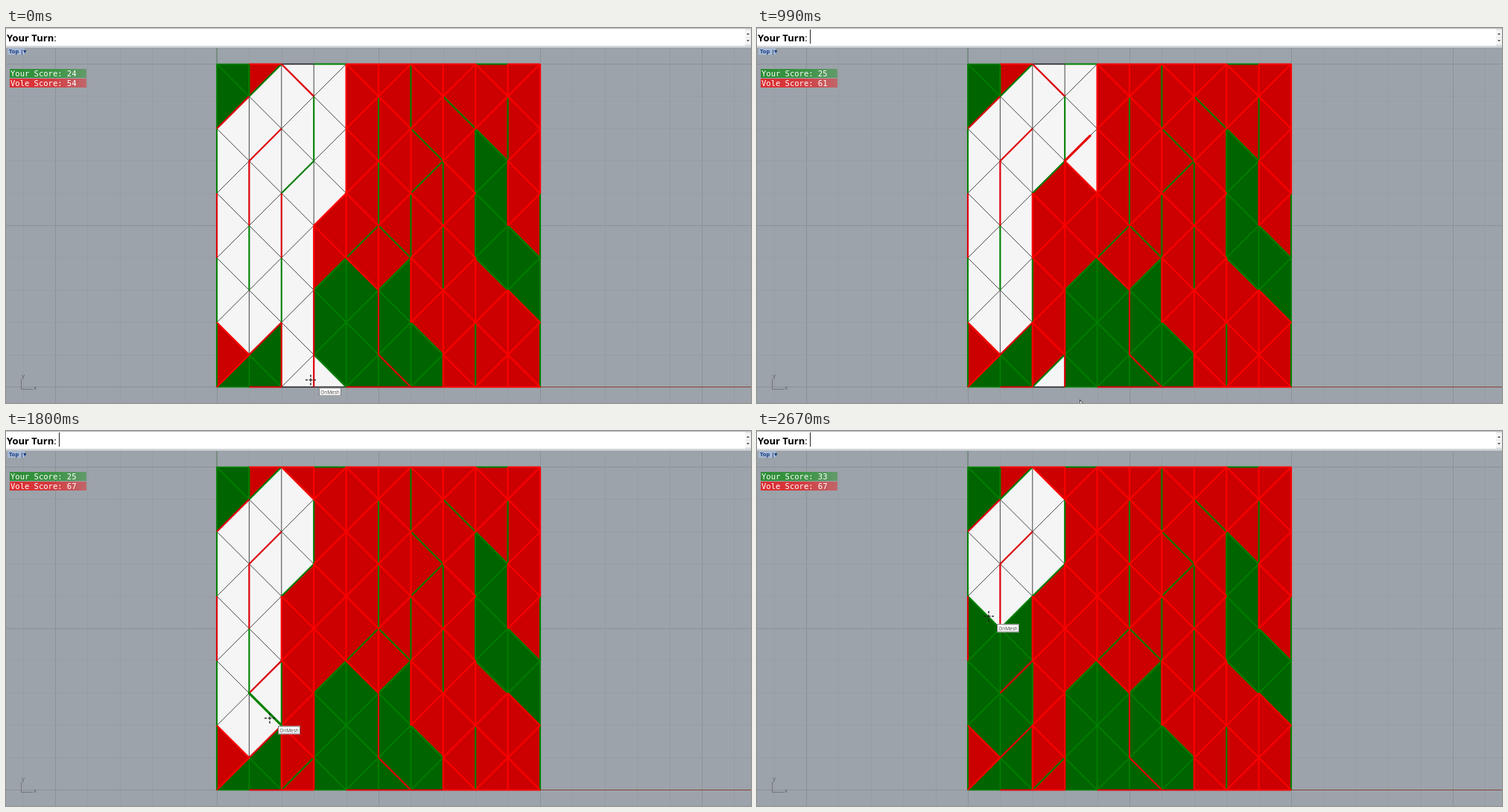
An HTML page with a canvas for the animation above (2.7 s loop, 1000 px wide and 504 px high).

```html
<!DOCTYPE html>
<html lang="en">
<head>
<meta charset="utf-8">
<title>Triangle game</title>
<style>
  html, body { margin: 0; width: 100%; height: 100%; overflow: hidden; background: #9ca3aa; }
  #stage { position: relative; width: 1000px; height: 504px; overflow: hidden; }
  canvas, .label { position: absolute; left: 0; top: 0; }
  .label { white-space: pre; line-height: 1; }
  #prompt { left: 1px; top: 6px; font: bold 13px/14px "Open Sans", "Noto Sans", sans-serif; color: #000; }
  #prompt span { font-weight: normal; }
  #view { left: 2px; top: 27px; width: 23px; height: 9px; background: #a9b9d2;
    font: bold 7.5px/9px "Open Sans", sans-serif; color: #123a80; text-indent: 2px; }
  .score { left: 5px; width: 103px; height: 12px; text-indent: 1px; color: #fff;
    font: 10.5px/12px "DejaVu Sans Mono", monospace; }
  #yours { top: 55px; background: linear-gradient(90deg, #2b8c34, #3d9546 60%, #639a6b); }
  #theirs { top: 68px; background: linear-gradient(90deg, #dc2c30, #d5393d 50%, #c0666a); }
  .axis { font: 8px/8px "Open Sans", sans-serif; color: #5c6166; }
  #tip { width: 28px; height: 9px; border: 1px solid #777; background: #fff; text-align: center;
    font: 6.5px/9px "Open Sans", sans-serif; color: #444; }
</style>
</head>
<body>
<div id="stage">
  <canvas id="board" width="1000" height="504"></canvas>
  <div id="prompt" class="label">Your Turn<span>:</span></div>
  <div id="view" class="label">Top |▾</div>
  <div id="yours" class="label score"></div>
  <div id="theirs" class="label score"></div>
  <div class="label axis" style="left:21px;top:463px">y</div>
  <div class="label axis" style="left:37px;top:479px">x</div>
  <div id="tip" class="label">OnMesh</div>
</div>
<script>
const LOOP = 2700, STEP = 30, N = 10, CELL = 43.4, LEFT = 283, TOP = 48.5;
const FILL = { R: '#cc0000', G: '#006400', W: '#f5f5f5' };
const byId = id => document.getElementById(id);
const ctx = byId('board').getContext('2d');

// One string per column, top to bottom: R and G are owned, W is free.
const columns = ['GGWWWWWWWRG', 'RWWWWWWWWGG', 'WWWWWWWWWWW', 'WWWWWRRGGGW', 'RRRRRRRGGGG',
  'RRRRRRRGGGG', 'RRRRRRRRRGG', 'RRRRRRRRRRR', 'RRRGGGGRRRR', 'RRRRRRGGRRR'];

// An edge is two vertices, each a column and a row digit in base 11.
const drawn = {
  R: '0406 1315 2426 282a 3537 3739 393a 4042 4244 5759 6668 797a 9395 0211 2031 1322 3544 ' +
     '0819 1928 0a19 596a 1a2a 4657 97a8 4a5a 5a6a 6a7a',
  G: '0204 0608 080a 1011 1517 2628 3133 5153 5355 6062 6466 7375 7577 888a 9193 a4a6 a8aa ' +
     '3040 8090 1120 2433 394a 4655 5566 6473 6273 7182'
};
const rivalMoves = '2839 2837 3726 2635 3524 3533 3344 3342 4231 3140 3031 2a3a 2030 1726';
const playerMoves = '3a4a 2a39 1728 1719 0817 0617 0615 1526 1524 0415';
const playerEnds = [120, 205, 1830, 1940, 2050, 2160, 2270, 2380, 2490, 2610];

const cursorPath = [
  [0, 409, 473], [90, 430, 476], [150, 397, 459], [205, 397, 462], [240, 433, 499],
  [1630, 433, 499], [1740, 362, 394], [1800, 354, 386], [1910, 331, 394], [2020, 306, 374],
  [2130, 310, 346], [2240, 306, 287], [2350, 348, 288], [2460, 347, 247], [2580, 311, 249], [2700, 311, 249]
];

const name = (i, j) => i.toString(11) + j.toString(11);
const keyOf = (a, b) => a < b ? a + b : b + a;
const normal = e => keyOf(e.slice(0, 2), e.slice(2));
const point = v => [LEFT + CELL * parseInt(v[0], 11), TOP + CELL * parseInt(v[1], 11)];
const ends = e => [point(e.slice(0, 2)), point(e.slice(2))];

const triangles = [], edges = {};
columns.forEach((column, i) => {
  for (let k = 0; k <= N; k++) {
    const apex = (i + k) % 2 ? i + 1 : i, base = 2 * i + 1 - apex;
    const v = [name(apex, k), name(base, Math.max(0, k - 1)), name(base, Math.min(N, k + 1))];
    const keys = [keyOf(v[0], v[1]), keyOf(v[1], v[2]), keyOf(v[2], v[0])];
    keys.forEach(key => (edges[key] = edges[key] || []).push(triangles.length));
    triangles.push({ corners: v.map(point), keys, owner: column[k] });
  }
});

function firstState() {
  const owners = triangles.map(t => t.owner), lines = {};
  for (const key in edges) {
    const sides = edges[key].map(n => owners[n]);
    if (!sides.includes('W')) lines[key] = sides.includes('G') ? 'G' : 'R';
  }
  for (const c in drawn) drawn[c].split(' ').forEach(e => { lines[normal(e)] = c; });
  return { owners, lines };
}

function play(state, move) {
  const key = normal(move.edge);
  const lines = { ...state.lines, [key]: move.color }, owners = state.owners.slice();
  edges[key].forEach(n => {
    if (owners[n] === 'W' && triangles[n].keys.every(k => lines[k])) owners[n] = move.color;
  });
  return { owners, lines };
}

const moves = [
  ...rivalMoves.split(' ').map((edge, n) => ({ edge, color: 'R', start: 212 + 100 * n, end: 312 + 100 * n })),
  ...playerMoves.split(' ').map((edge, n) => ({ edge, color: 'G', start: playerEnds[n] - 60, end: playerEnds[n] }))
].sort((a, b) => a.end - b.end);
const states = [firstState()];
moves.forEach(m => states.push(play(states[states.length - 1], m)));

function line(x1, y1, x2, y2, color, width) {
  ctx.strokeStyle = color;
  ctx.lineWidth = width;
  ctx.beginPath();
  ctx.moveTo(x1, y1);
  ctx.lineTo(x2, y2);
  ctx.stroke();
}

function box(x, y, w, h, color) {
  ctx.fillStyle = color;
  ctx.fillRect(x, y, w, h);
}

function polygon(points, color) {
  ctx.fillStyle = color;
  ctx.beginPath();
  points.forEach(p => ctx.lineTo(...p));
  ctx.fill();
}

function drawBackground() {
  box(0, 0, 1000, 504, '#9ca3aa');
  for (let n = -6; n <= 16; n++) {
    const color = n % 5 ? '#969da3' : '#8a9197';
    const x = Math.round(LEFT + CELL * n) + 0.5, y = Math.round(TOP + CELL * n - 0.5) + 0.5;
    line(x, 27, x, 504, color, 1);
    if (n >= 0 && n <= N) line(0, y, 1000, y, color, 1);
  }
  line(283, 27, 283, 48, '#5c7f62', 1);
  line(717, 482.5, 1000, 482.5, '#8a4238', 1);
  line(20.5, 472, 20.5, 486, '#70767b', 1);
  line(20, 485.5, 36, 485.5, '#70767b', 1);
}

function drawBar(t) {
  box(0, 0, 1000, 27, '#e4e6e8');
  box(0, 1, 992, 23, '#fff');
  box(0, 0, 1000, 1, '#b4b8bc');
  box(0, 24, 1000, 1, '#c3c7ca');
  box(0, 26, 1000, 1, '#a9afb5');
  [3, 13].forEach(y => box(992, y, 7, 9, '#f5f5f5'));
  polygon([[994, 9], [998, 9], [996, 6.5]], '#555');
  polygon([[994, 16], [998, 16], [996, 18.5]], '#555');
  if (t >= STEP) box(71, 2, 1, 19, '#222');
}

function drawBoard({ owners, lines }) {
  triangles.forEach((tri, n) => {
    polygon(tri.corners, FILL[owners[n]]);
    ctx.strokeStyle = FILL[owners[n]];
    ctx.lineWidth = 0.6;
    ctx.closePath();
    ctx.stroke();
  });
  const layer = (wanted, paint) => {
    for (const key in edges) {
      if (lines[key] !== wanted) continue;
      const [a, b] = ends(key), sides = edges[key].map(n => owners[n]);
      paint(a, b, sides);
    }
  };
  layer(undefined, (a, b, sides) => line(...a, ...b, '#1c1c1c', sides.length > 1 ? 0.8 : 1.5));
  layer('G', (a, b, sides) =>
    line(...a, ...b, '#008000', sides.every(s => s === 'G') ? 1.7 : 2.1));
  layer('R', (a, b, sides) =>
    line(...a, ...b, sides.includes('R') ? '#fa0000' : '#dc000a', 2.2));
}

function drawMove(move, t) {
  const [a, b] = ends(move.edge);
  const part = move.color === 'R' ? (t - move.start) / (move.end - move.start) : 1;
  const tip = a.map((v, n) => v + (b[n] - v) * part);
  ctx.lineCap = 'round';
  line(...a, ...tip, move.color === 'R' ? '#e60008' : '#008000', 3.2);
  ctx.lineCap = 'butt';
}

function cursorAt(t) {
  const n = cursorPath.findIndex(p => p[0] > t);
  const [t0, x0, y0] = cursorPath[n - 1], [t1, x1, y1] = cursorPath[n];
  const f = (t - t0) / (t1 - t0);
  return [Math.round(x0 + (x1 - x0) * f), Math.round(y0 + (y1 - y0) * f)];
}

function drawCursor(t) {
  const [x, y] = cursorAt(t);
  const onMesh = y < 483;
  const tip = byId('tip').style;
  tip.display = onMesh ? 'block' : 'none';
  tip.transform = `translate(${x + 11}px, ${y + 10.5}px)`;
  if (!onMesh) {
    polygon([[x, y], [x, y + 12], [x + 8, y + 8]], '#333');
    polygon([[x + 0.8, y + 1.8], [x + 0.8, y + 10], [x + 6, y + 7.5]], '#fff');
    return;
  }
  [[1, 0], [-1, 0], [0, 1], [0, -1]].forEach(([dx, dy]) => {
    line(x + dx * 4, y + dy * 4, x + dx * 7, y + dy * 7, '#222', 1.4);
  });
  line(x - 2.5, y, x + 2.5, y, '#222', 1.2);
  line(x, y - 2.5, x, y + 2.5, '#222', 1.2);
}

function render(t) {
  const state = states[moves.filter(m => m.end <= t).length];
  const count = c => state.owners.filter(o => o === c).length;
  drawBackground();
  drawBar(t);
  drawBoard(state);
  moves.filter(m => m.start <= t && t < m.end).forEach(m => drawMove(m, t));
  drawCursor(t);
  byId('yours').textContent = 'Your Score: ' + count('G');
  byId('theirs').textContent = 'Vole Score: ' + count('R');
}

const begin = performance.now();
function tick() {
  const t = (performance.now() - begin) % LOOP;
  render(Math.floor(t / STEP) * STEP);
  requestAnimationFrame(tick);
}
tick();
</script>
</body>
</html>
```
